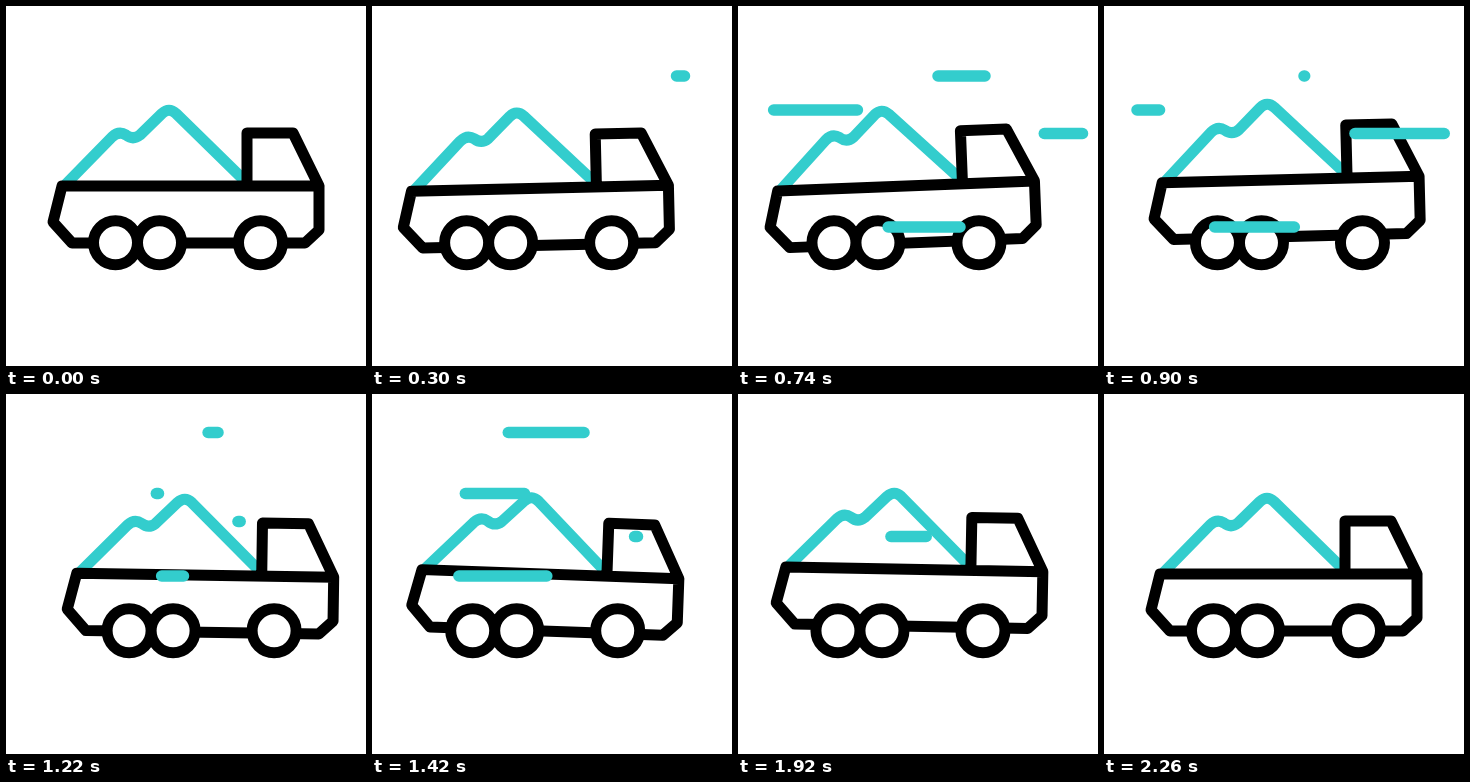
These frames come from a looping animation (360x360 px, 2400 ms). An HTML page with a canvas:

```html
<!DOCTYPE html>
<html lang="en">
<head>
<meta charset="utf-8">
<title>Loaded truck</title>
<style>
  html, body { margin: 0; width: 100%; height: 100%; overflow: hidden; background: #fff; }
  canvas { display: block; width: 360px; height: 360px; }
</style>
</head>
<body>
<canvas id="stage" width="360" height="360"></canvas>
<script>
const ctx = document.getElementById('stage').getContext('2d');
const LOOP = 2400, STEP = 20, SETTLED = 2240;
const TEAL = '#33cdcd', BLACK = '#000', WHITE = '#fff';
const PIVOT = { x: 241, y: 255 };
const LINE = 11;

const mountain = new Path2D(
  'M60 178 L106 131 Q113 124.5 120 129 Q127 134.5 134 129 L156 107.5 Q163 101 170 107.5 L240 176');
const body = new Path2D(
  'M56 180 H313 V224 L299 237 H66 L47 216 Z M241 180 V127 H287 L313 180');
const wheels = [109.5, 153.5, 254.5];

// Every streak has the same length and life; only its start and left end differ.
const streakLength = 112.5, headTime = 460, tailDelay = 293, tailTime = 400;
const streaks = [
  { start: 225, x: 200, y: 70 },
  { start: 322, x: 33, y: 104 },
  { start: 467, x: 109.5, y: 221 },
  { start: 560, x: 232, y: 127.5 },
  { start: 1090, x: 65, y: 182 },
  { start: 1136, x: 99.5, y: 38.5 },
  { start: 1182, x: 40, y: 99.5 },
  { start: 1376, x: 153, y: 142.5 }
];

function ease(p) {
  p = Math.min(1, Math.max(0, p));
  return p * p * (3 - 2 * p);
}

// Sums eased moves, each one leading from the last value to the next.
function glide(t, ...keys) {
  return keys.slice(1).reduce((value, [end, to], i) => {
    const [begin, from] = keys[i];
    return value + (to - from) * ease((t - begin) / (end - begin));
  }, keys[0][1]);
}

const drive = t => glide(t, [0, 0], [540, -25.5], [1120, 18], [1600, -21.2], [2200, 0]);
const tilt = t => glide(t, [0, 0], [590, -2.55], [1620, 2.55], [2160, 0]) * Math.PI / 180;

// The load sags a little and hops once a cycle, fading in and out with the ride.
function bounce(t) {
  const fade = Math.sin(Math.PI * Math.min(1, t / SETTLED));
  const hop = ((1 + Math.cos(2 * Math.PI * (t - 900) / 1020)) / 2) ** 3;
  return fade * (2.4 - 10.8 * hop);
}

function stroke(path, color, width = LINE) {
  ctx.strokeStyle = color;
  ctx.lineWidth = width;
  ctx.stroke(path);
}

function drawBody(t) {
  ctx.save();
  ctx.translate(PIVOT.x, PIVOT.y + bounce(t));
  ctx.rotate(tilt(t));
  ctx.translate(-PIVOT.x, -PIVOT.y);
  stroke(mountain, TEAL);
  stroke(body, BLACK);
  ctx.restore();
}

function drawWheels() {
  const radius = 22, rims = new Path2D();
  for (const x of wheels) {
    rims.moveTo(x + radius, 236.8);
    rims.arc(x, 236.8, radius, 0, Math.PI * 2);
  }
  ctx.fillStyle = WHITE;
  ctx.fill(rims);
  stroke(rims, BLACK);
}

function drawStreak(t, { start, x, y }) {
  const age = t - start;
  if (age <= 0 || age >= tailDelay + tailTime) return;
  const right = x + streakLength;
  const line = new Path2D();
  line.moveTo(right - streakLength * ease(age / headTime), y);
  line.lineTo(right - streakLength * ease((age - tailDelay) / tailTime) + 0.01, y);
  stroke(line, TEAL, 11.5);
}

function draw(t) {
  ctx.fillStyle = WHITE;
  ctx.fillRect(0, 0, 360, 360);
  ctx.lineCap = ctx.lineJoin = 'round';
  ctx.save();
  ctx.translate(drive(t), 0);
  drawBody(t);
  drawWheels();
  ctx.restore();
  streaks.forEach(streak => drawStreak(t, streak));
}

const began = performance.now();
function tick() {
  const t = (performance.now() - began) % LOOP;
  draw(Math.floor(t / STEP) * STEP);
  requestAnimationFrame(tick);
}
tick();
</script>
</body>
</html>
```
